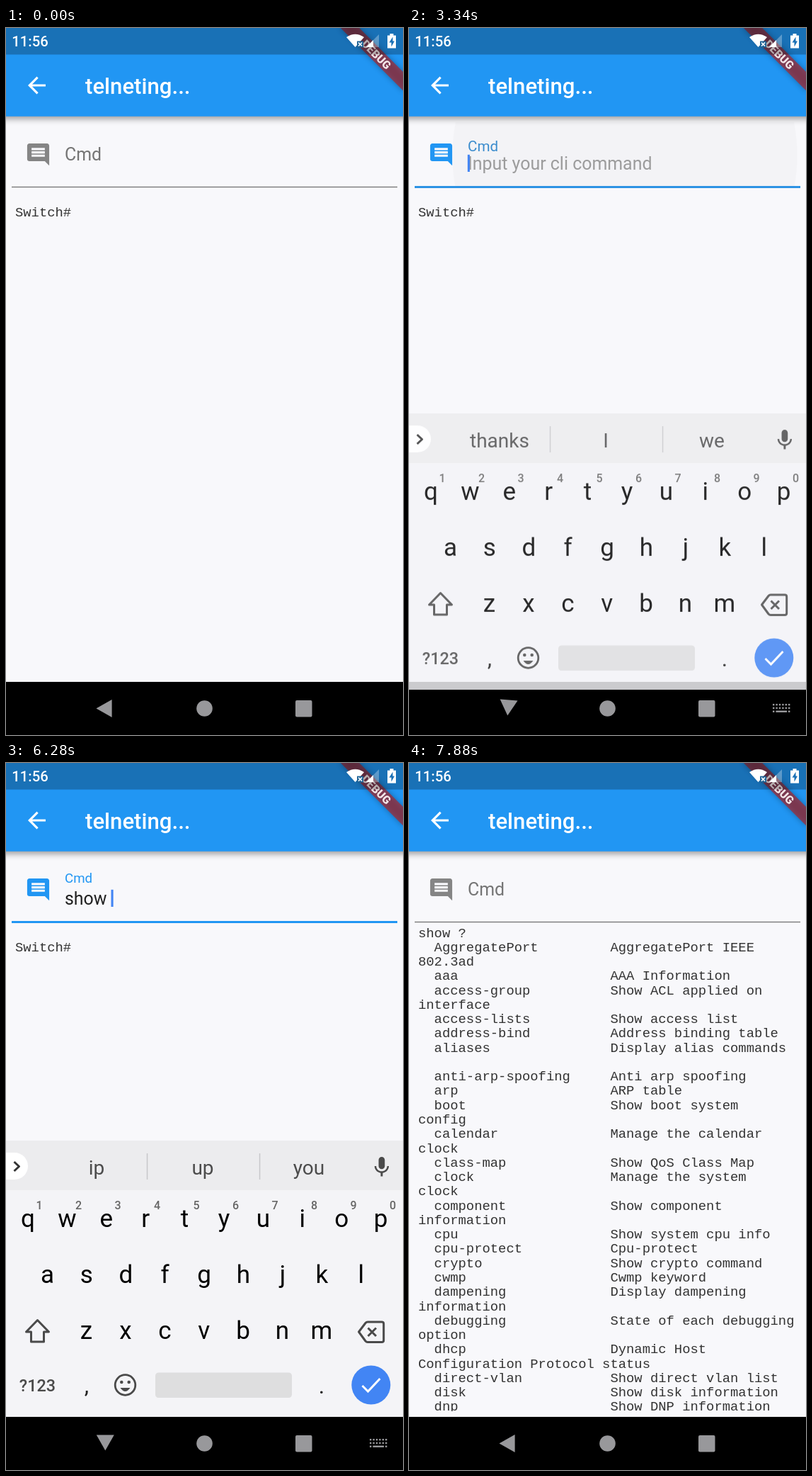
Recreate the animation shown at these times as an HTML page with a canvas. Size 561 by 998 pixels, loop 8000 ms.

```html
<!DOCTYPE html>
<html lang="en">
<head>
<meta charset="utf-8">
<title>telneting...</title>
<style>
html, body { margin: 0; width: 100%; height: 100%; overflow: hidden; background: #000; }
canvas { display: block; }
</style>
</head>
<body>
<canvas id="stage" width="561" height="998"></canvas>
<script>
const W = 561, H = 998, LOOP = 8000, DP = 1.558;
const SANS = 'Roboto, sans-serif';
const MONO = '"Liberation Mono", monospace';
const BLUE = [33, 150, 243], GREY = [117, 117, 117];
const OPEN = 3252, PRESS = 7510, HIDE = 7606, BLUR = 7626, UNTURN = 7670;

const screen = document.getElementById('stage').getContext('2d');
const layer = document.createElement('canvas');
layer.width = W;
layer.height = H;
const board = layer.getContext('2d');

const ICON = {
  back: new Path2D('M20 11H7.83l5.59-5.59L12 4l-8 8 8 8 1.41-1.41L7.83 13H20v-2z'),
  comment: new Path2D('M21.99 4c0-1.1-.89-2-1.99-2H4c-1.1 0-2 .9-2 2v12c0 1.1.9 2 2 2h14l4 4-.01-18zM18 14H6v-2h12v2zm0-3H6V9h12v2zm0-3H6V6h12v2z'),
  mic: new Path2D('M12 14c1.66 0 3-1.34 3-3V5c0-1.66-1.34-3-3-3S9 3.34 9 5v6c0 1.66 1.34 3 3 3zm5.3-3c0 3-2.54 5.1-5.3 5.1S6.7 14 6.7 11H5c0 3.41 2.72 6.23 6 6.72V21h2v-3.28c3.28-.48 6-3.3 6-6.72h-1.7z'),
  wifi: new Path2D('M493.5 27L481 13Q493.5 4.5 506 13Z'),
  signal: new Path2D('M509 27H527V9Z'),
  signalOn: new Path2D('M509 27H519V17Z'),
  battery: new Path2D('M542.5 8h5v2.5h3.5v18h-12v-18h3.5z'),
  bolt: new Path2D('M546.5 12.5L541.5 20.5H544.5V26.5L549 18.5H546.5Z'),
  shift: new Path2D('M44.5 786.5L60.5 803H53.5V817H35.5V803H28.5Z'),
  erase: new Path2D('M498.5 803L508 790.5Q509.3 789 511 789H531Q533.7 789 533.7 791.5V815Q533.7 817.5 531 817.5H511Q509.3 817.5 508 816ZM511.5 797.5L523 809M523 797.5L511.5 809'),
  smile: new Path2D('M161.5 882Q168.5 892 175.5 882Z'),
  tick: new Path2D('M503.5 879L511.5 887L528.5 869'),
  chevron: new Path2D('M11.5 563L18.5 569.5L11.5 576')
};

// Each entry: start time, field text, suggestions
const TYPING = [
  [0, '', 'thanks|I|we'],
  [4540, 's', 's|so|she'],
  [4710, 'sh', 'sh|she|should'],
  [5040, 'sho', 'sho|show|should'],
  [5240, 'show', 'show|shows|showing'],
  [5740, 'show ', 'ip|up|you'],
  [6810, 'show ?', 'thanks|I|we'],
  [BLUR, '', 'thanks|I|we']
];
const CARET = [[3260, 4170], [4540, 6230], [6280, 7310]];

// A bar separates command and description; plain lines are wrapped text
const OUTPUT = `show ?
AggregatePort|AggregatePort IEEE
802.3ad
aaa|AAA Information
access-group|Show ACL applied on
interface
access-lists|Show access list
address-bind|Address binding table
aliases|Display alias commands

anti-arp-spoofing|Anti arp spoofing
arp|ARP table
boot|Show boot system
config
calendar|Manage the calendar
clock
class-map|Show QoS Class Map
clock|Manage the system
clock
component|Show component
information
cpu|Show system cpu info
cpu-protect|Cpu-protect
crypto|Show crypto command
cwmp|Cwmp keyword
dampening|Display dampening
information
debugging|State of each debugging
option
dhcp|Dynamic Host
Configuration Protocol status
direct-vlan|Show direct vlan list
disk|Show disk information
dnp|Show DNP information`.split('\n').map(line => {
  const [name, about] = line.split('|');
  return about ? '  ' + name.padEnd(22) + about : line;
});

const clamp = v => Math.min(1, Math.max(0, v));
const span = (t, start, length) => clamp((t - start) / length);
const mix = (a, b, k) => a + (b - a) * k;
const mixColor = (a, b, k) => `rgb(${a.map((v, i) => Math.round(mix(v, b[i], k)))})`;
const easeOut = (k, power) => 1 - (1 - k) ** power;

// cubic-bezier(.4, 0, .2, 1)
function standard(x) {
  let lo = 0, hi = 1, u = x;
  for (let i = 0; i < 20; i++) {
    u = (lo + hi) / 2;
    const bx = 1.2 * u * (1 - u) ** 2 + 0.6 * u * u * (1 - u) + u ** 3;
    if (bx < x) lo = u; else hi = u;
  }
  return u * u * (3 - 2 * u);
}

function text(c, str, x, y, size, color, weight = 400, align = 'left', family = SANS) {
  c.font = `${weight} ${size}px ${family}`;
  c.textAlign = align;
  c.fillStyle = color;
  c.fillText(str, x, y);
}

function rect(c, x, y, w, h, color, radius = 0) {
  c.fillStyle = color;
  c.beginPath();
  c.roundRect(x, y, w, h, radius);
  c.fill();
}

function disc(c, x, y, r, color) {
  c.fillStyle = color;
  c.beginPath();
  c.arc(x, y, r, 0, Math.PI * 2);
  c.fill();
}

function stroke(c, path, color, width) {
  c.strokeStyle = color;
  c.lineWidth = width;
  c.stroke(path);
}

function icon(c, path, x, y, scale, color) {
  c.save();
  c.translate(x, y);
  c.scale(scale, scale);
  c.fillStyle = color;
  c.fill(path);
  c.restore();
}

function drawAppBar(c) {
  c.save();
  c.shadowColor = 'rgba(0,0,0,.4)';
  c.shadowBlur = 9;
  c.shadowOffsetY = 3;
  rect(c, -20, 0, W + 40, 124.7, '#2196f3');
  c.restore();
  icon(c, ICON.back, 24.8, 62.3, DP, '#fff');
  text(c, 'telneting...', 112, 93, 31.16, '#fff', 500);
}

function drawBanner(c) {
  c.save();
  c.translate(W, 0);
  c.rotate(Math.PI / 4);
  c.scale(DP, DP);
  c.save();
  c.shadowColor = 'rgba(0,0,0,.5)';
  c.shadowBlur = 9;
  rect(c, -40, 28, 80, 12, 'rgba(183,28,28,.63)');
  c.restore();
  text(c, 'DEBUG', 0, 37.7, 10.2, '#f3e6e8', 900, 'center');
  c.restore();
}

function drawStatusBar(c) {
  rect(c, 0, 0, W, 37.4, 'rgba(0,0,0,.25)');
  text(c, '11:56', 8.3, 26, 20.3, '#fff', 500);
  c.fillStyle = '#fff';
  c.fill(ICON.wifi);
  rect(c, 496, 18.5, 9, 9, '#1f6395');
  stroke(c, new Path2D('M498 20.5L503 25.5M503 20.5L498 25.5'), '#fff', 1.7);
  c.fillStyle = 'rgba(255,255,255,.3)';
  c.fill(ICON.signal);
  c.fillStyle = '#fff';
  c.fill(ICON.signalOn);
  c.fill(ICON.battery);
  c.fillStyle = '#1970b6';
  c.fill(ICON.bolt);
}

function drawRipple(c, t) {
  const age = t - OPEN;
  if (age < 0 || age > 210) return;
  c.save();
  c.beginPath();
  c.rect(8, 133, 545, 90);
  c.clip();
  disc(c, 305, 180, 241 * Math.min(1.1, age / 88), `rgba(0,0,0,${0.035 * (1 - age / 210)})`);
  c.restore();
}

function drawField(c, t, value) {
  const focused = t >= OPEN && t < BLUR;
  const lift = t < BLUR ? standard(span(t, OPEN, 200)) : 1 - standard(span(t, BLUR, 200));
  drawRipple(c, t);
  icon(c, ICON.comment, 26.8, 160, DP, focused ? '#2196f3' : '#858585');
  text(c, 'Cmd', 83, mix(187, 169, lift), mix(24.93, 18.7, lift), mixColor(GREY, BLUE, lift));

  const edge = Math.min(1, lift * 1.25), thick = mix(1.6, 3.1, edge);
  rect(c, 8, 224.5 - thick / 2, 545, thick, mixColor([128, 128, 128], BLUE, edge));

  if (focused) {
    c.globalAlpha = lift * (1 - standard(span(t, 4540, 200)));
    text(c, 'Input your cli command', 83, 199.5, 24.93, '#757575');
    c.globalAlpha = 1;
  }
  text(c, value, 83, 199.5, 24.93, '#212121');
  const width = c.measureText(value).width;
  if (value && !value.includes(' ')) rect(c, 83, 202, width, 1.5, '#212121');
  if (CARET.some(([on, off]) => t >= on && t < off)) {
    rect(c, 82.8 + width, 178.8, 3.1, 24.2, '#4285f4');
  }
}

function drawTerminal(c, t) {
  const lines = t < 7640 ? ['', 'Switch#'] : t < 7720 ? ['s'] : OUTPUT;
  c.save();
  c.beginPath();
  c.rect(0, 226, W, 689);
  c.clip();
  lines.forEach((line, i) => text(c, line, 13, 245.5 + i * 20.27, 18.85, '#333', 400, 'left', MONO));
  c.restore();
}

function drawKeys(c, row, x, y) {
  [...row].forEach((key, i) => text(c, key, x + i * 55.4, y, 35, '#000', 400, 'center'));
}

function drawKeyboard(c, t, words) {
  const ink = '#4a4a4a';
  c.clearRect(0, 0, W, H);
  c.lineJoin = 'round';
  rect(c, 0, 533, W, 70, '#ececee');
  rect(c, 0, 603, W, 320, '#f4f4f7');
  rect(c, 0, 923, W, 75, '#000');

  rect(c, -30, 550, 61, 38, '#fff', 19);
  stroke(c, ICON.chevron, '#333', 3);
  rect(c, 198.8, 551, 1.5, 37, '#c8c8ca');
  rect(c, 357.8, 551, 1.5, 37, '#c8c8ca');
  words.split('|').forEach((word, i) => text(c, word, 128 + i * 150, 580.5, 28, '#4c4c4c', 400, 'center'));
  icon(c, ICON.mic, 513.5, 553, 1.45, ink);

  drawKeys(c, 'qwertyuiop', 31, 655);
  drawKeys(c, 'asdfghjkl', 58.5, 734);
  drawKeys(c, 'zxcvbnm', 113.5, 812.5);
  [...'1234567890'].forEach((n, i) => text(c, n, 47 + i * 55.5, 630, 16, '#666', 500, 'center'));

  stroke(c, ICON.shift, ink, 3);
  stroke(c, ICON.erase, ink, 3);
  text(c, '?123', 44.5, 887, 23.4, ink, 500, 'center');
  text(c, ',', 114, 889, 32, '#222', 400, 'center');
  text(c, '.', 446, 890, 32, '#222', 400, 'center');

  const face = new Path2D();
  face.arc(168.5, 878, 14.3, 0, Math.PI * 2);
  stroke(c, face, ink, 2.8);
  disc(c, 163.3, 874, 2.3, ink);
  disc(c, 173.7, 874, 2.3, ink);
  c.fillStyle = ink;
  c.fill(ICON.smile);

  rect(c, 211, 860.5, 193, 35.5, '#dededf', 4.5);
  const pressed = t >= PRESS;
  disc(c, 515.8, 878, pressed ? 28.2 : 27.5, pressed ? '#3b7be6' : '#4285f4');
  c.lineJoin = 'miter';
  stroke(c, ICON.tick, '#fff', 3);
}

function showKeyboard(c, t, words) {
  if (t < OPEN || t >= HIDE + 150) return;
  const leave = span(t, HIDE, 150) ** 5;
  const drop = 100 * ((1 - span(t, OPEN, 250)) ** 5 + leave);
  drawKeyboard(board, t, words);
  c.globalAlpha = easeOut(span(t, OPEN, 150), 2) * (1 - leave);
  c.drawImage(layer, 0, drop);
  c.globalAlpha = 1;
}

function drawNavIcons(c, t) {
  const color = '#98989b';
  const turn = easeOut(span(t, OPEN, 200), 5) - easeOut(span(t, UNTURN, 200), 5);
  c.save();
  c.translate(140.3, 960.5 - 2.8 * turn);
  c.rotate(-turn * Math.PI / 2);
  c.fillStyle = color;
  c.fill(new Path2D('M-12.8 0L9.3 -12.5V12.5Z'));
  c.restore();
  disc(c, 280.5, 960.5, 11.3, color);
  rect(c, 409, 949, 23.5, 23.5, color, 2);

  if (t < OPEN || t >= UNTURN) return;
  for (let i = 0; i < 6; i++) {
    const x = 514 + i * 4.4;
    rect(c, x, 954, 2.4, 2.4, color);
    rect(c, x, 958.8, 2.4, 2.4, color);
  }
  rect(c, 514, 963.6, 2.4, 2.4, color);
  rect(c, 518.4, 963.6, 15.6, 2.4, color);
  rect(c, 536, 963.6, 2.4, 2.4, color);
}

function draw(t) {
  const c = screen;
  const [, value, words] = TYPING.findLast(step => t >= step[0]);
  rect(c, 0, 0, W, H, '#f8f8fb');
  drawField(c, t, value);
  drawTerminal(c, t);
  drawAppBar(c);
  drawBanner(c);
  drawStatusBar(c);
  rect(c, 0, 923, W, 75, '#000');
  showKeyboard(c, t, words);
  drawNavIcons(c, t);
}

const start = performance.now();
function tick() {
  draw((performance.now() - start) % LOOP);
  requestAnimationFrame(tick);
}
tick();
</script>
</body>
</html>
```
